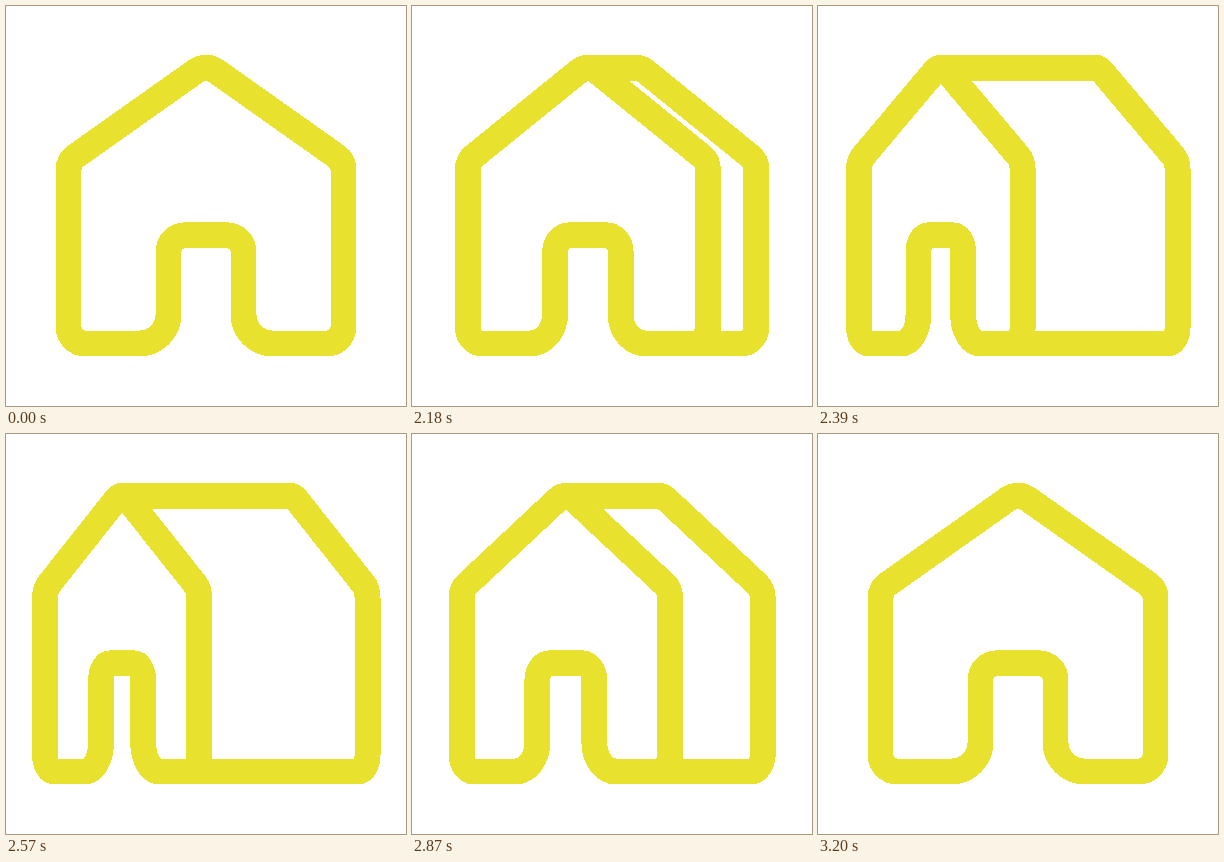
Write an HTML page with a canvas that moves like this. It is 400 by 400 pixels and loops after 3260 ms.

```html
<!DOCTYPE html>
<html lang="en">
<head>
<meta charset="utf-8">
<title>House</title>
<style>
  html, body { margin: 0; width: 100%; height: 100%; overflow: hidden; background: #fff; }
  canvas { display: block; }
</style>
</head>
<body>
<canvas id="stage" width="400" height="400"></canvas>
<script>
const ctx = document.getElementById('stage').getContext('2d', { willReadFrequently: true });
const LOOP = 3260, START = 2000, HALF = 600, STEP = 30;
const NEAR_SHIFT = 84, FAR_SHIFT = 84.6, SQUEEZE = 0.44;
const FLOOR = 337.5, EAVE = 155.3, PEAK = 57.9, DOOR = 229.17;
const WALL = 137.5, JAMB = 37.5, R = 50 / 3, FOOT = 175 / 6;
const PITCH = Math.atan2(EAVE - PEAK, WALL);
const RIDGE = PEAK + R * (1 / Math.cos(PITCH) - 1);

// Cubic Bezier easing with control points (a, 0) and (b, 1)
function ease(a, b, x) {
  if (x <= 0) return 0;
  if (x >= 1) return 1;
  let lo = 0, hi = 1, u;
  for (let i = 0; i < 24; i++) {
    u = (lo + hi) / 2;
    const v = 1 - u;
    if (3 * v * v * u * a + 3 * v * u * u * b + u ** 3 < x) lo = u; else hi = u;
  }
  return u * u * (3 - 2 * u);
}

function opening(ms) {
  const t = Math.floor((ms - START) / STEP) * STEP / HALF;
  return t < 1 ? ease(0.5, 0.14, t) : 1 - ease(0.59, 0.325, t - 1);
}

// Build a path squeezed horizontally around cx, then stroke it at full weight
function outline(cx, squeeze, build) {
  ctx.setTransform(squeeze, 0, 0, 1, cx, 0);
  ctx.beginPath();
  build();
  ctx.setTransform(1, 0, 0, 1, 0, 0);
  ctx.stroke();
}

function rightWall() {
  ctx.arcTo(WALL, EAVE, WALL, FLOOR, R);
  ctx.arcTo(WALL, FLOOR, 0, FLOOR, R);
}

function front() {
  ctx.moveTo(-100, FLOOR);
  ctx.arcTo(-WALL, FLOOR, -WALL, EAVE, R);
  ctx.arcTo(-WALL, EAVE, 0, PEAK, R);
  ctx.arcTo(0, PEAK, WALL, EAVE, R);
  rightWall();
  ctx.arcTo(JAMB, FLOOR, JAMB, DOOR, FOOT);
  ctx.arcTo(JAMB, DOOR, -JAMB, DOOR, R);
  ctx.arcTo(-JAMB, DOOR, -JAMB, FLOOR, R);
  ctx.arcTo(-JAMB, FLOOR, -WALL, FLOOR, FOOT);
  ctx.closePath();
}

// Ridge, rear roof, rear wall and floor; depth is the distance to the front
function rear(depth) {
  ctx.moveTo(-depth, RIDGE);
  ctx.lineTo(0, RIDGE);
  ctx.arc(0, RIDGE + R, R, -Math.PI / 2, PITCH - Math.PI / 2);
  rightWall();
  ctx.lineTo(WALL - R - depth, FLOOR);
}

// Make every touched pixel solid, for hard edges
function harden() {
  const image = ctx.getImageData(0, 0, 400, 400), data = image.data;
  for (let i = 0; i < data.length; i += 4) {
    const on = data[i + 3] > 16;
    data.set(on ? [232, 225, 46, 255] : [255, 255, 255, 255], i);
  }
  ctx.putImageData(image, 0, 0);
}

function draw(open) {
  const squeeze = 1 - SQUEEZE * open;
  const near = 200 - NEAR_SHIFT * open, far = 200 + FAR_SHIFT * open;
  ctx.clearRect(0, 0, 400, 400);
  ctx.lineWidth = 25;
  outline(near, squeeze, front);
  outline(far, squeeze, () => rear((far - near) / squeeze));
  harden();
}

let shown;
function frame(now) {
  const open = opening(now % LOOP);
  if (open !== shown) draw(shown = open);
  requestAnimationFrame(frame);
}
requestAnimationFrame(frame);
</script>
</body>
</html>
```
